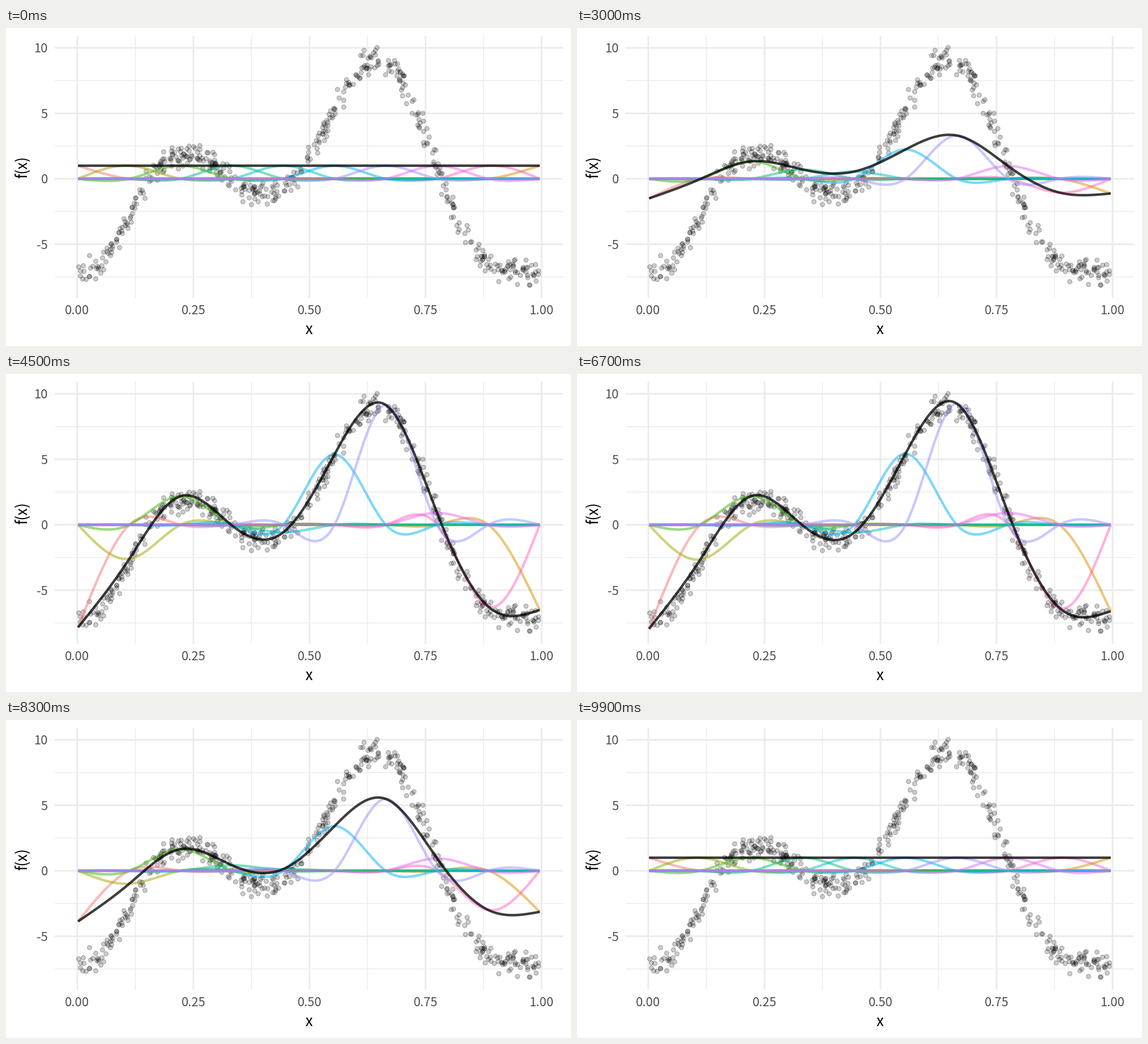
A matplotlib script that plays this animation: 998x561 px, repeating every 10 s.

```python
import numpy as np
import matplotlib.pyplot as plt
from matplotlib.animation import FuncAnimation

W, H, DPI = 998, 561, 64
FRAMES, INTERVAL = 100, 100
FONT = "Noto Sans CJK JP"
LEFT, RIGHT, TOP, BOTTOM = 86, 984, 14, 476

X_MIN, X_MAX, N_POINTS = .0015, .996, 490
COEFS = np.array([-7.95, -2.65, 2.2, -.06, -.6, 5.43, 9.25, .9, -6.35, -6.6])
COLORS = ["#F8766D", "#A3A500", "#39B600", "#00BF7D", "#00BFC4",
          "#00B0F6", "#9590FF", "#E76BF3", "#FF62BC", "#D89000"]
KNOTS = np.linspace(X_MIN, X_MAX, len(COEFS))
ORDER = np.roll(np.arange(len(COEFS)), 2)


def px(n):
    """Pixels to points."""
    return n * 72 / DPI


def sx(x):
    return 126 + 820 * np.asarray(x)


def sy(y):
    return 266 - 23.1 * np.asarray(y)


def signal(x):
    return x**11 * (10 * (1 - x))**6 + 10 * (10 * x)**3 * (1 - x)**10 - 7


def cardinal_basis(knots, x):
    """Natural cubic splines, each 1 at its own knot and 0 at the others."""
    n, h = len(knots), knots[1] - knots[0]
    a, b = np.eye(n), np.zeros((n, n))
    for i in range(1, n - 1):
        a[i, i - 1:i + 2] = 1, 4, 1
        b[i, i - 1:i + 2] = 6, -12, 6
    val, curv = np.eye(n), np.linalg.solve(a, b)
    j = np.clip(np.searchsorted(knots, x) - 1, 0, n - 2)
    r = ((x - knots[j]) / h)[:, None]
    l = 1 - r
    return (l * val[j] + r * val[j + 1]
            + ((l**3 - l) * curv[j] + (r**3 - r) * curv[j + 1]) / 6)


def cubic_in_out(t):
    t = np.clip(t, 0, 1)
    return 4 * t**3 if t < .5 else 1 - 4 * (1 - t)**3


def weight(i):
    """0 for the plain basis, 1 for the fitted one."""
    return cubic_in_out((i - 16) / 34) - cubic_in_out((i - 67) / 33)


fig = plt.figure(figsize=(W / DPI, H / DPI), dpi=DPI, facecolor="white")
ax = fig.add_axes([0, 0, 1, 1])
ax.set(xlim=(0, W), ylim=(H, 0))
ax.axis("off")


def grid(xs, ys, width):
    style = dict(colors="#EBEBEB", linewidths=px(width), zorder=1, snap=False)
    ax.vlines(sx(xs), TOP, BOTTOM, **style)
    ax.hlines(sy(ys), LEFT, RIGHT, **style)


def label(x, y, text, size, color, **kw):
    ax.text(x, y, text, fontsize=px(size), color=color, family=FONT,
            va="baseline", **kw)


x_ticks, y_ticks = np.arange(0, 1.1, .25), np.arange(-5, 11, 5)
grid(x_ticks[:-1] + .125, y_ticks - 2.5, 1.45)
grid(x_ticks, y_ticks, 2.9)
for v in x_ticks:
    label(sx(v), 505, f"{v:.2f}", 22, "#4D4D4D", ha="center")
for v in y_ticks:
    label(74, sy(v) + 8, str(v), 22, "#4D4D4D", ha="right")
label(535.5, 540, "x", 26, "black", ha="center")
label(36.5, 245.5, "f(x)", 26, "black", ha="center", rotation=90,
      rotation_mode="anchor")

rng = np.random.default_rng(20)
dx = rng.uniform(X_MIN, X_MAX, N_POINTS)
dy = signal(dx) + np.clip(rng.normal(0, .48, N_POINTS), -1.1, 1.1)
ax.scatter(sx(dx), sy(dy), s=px(7.8)**2, facecolor=(0, 0, 0, .2),
           edgecolor=(0, 0, 0, .31), linewidth=px(1), zorder=2)

grid_x = np.linspace(X_MIN, X_MAX, 400)
basis = cardinal_basis(KNOTS, grid_x)


def curve(color, alpha):
    return ax.plot([], [], color=color, alpha=alpha, lw=px(4.4), zorder=3,
                   solid_capstyle="butt", solid_joinstyle="round",
                   snap=False)[0]


parts = [curve(COLORS[k - 1 if k > len(COLORS) else k], .5) for k in ORDER]
total = curve("black", .76)


def draw(i):
    scaled = basis * (1 + weight(i) * (COEFS - 1))
    for line, k in zip(parts, ORDER):
        line.set_data(sx(grid_x), sy(scaled[:, k]))
    total.set_data(sx(grid_x), sy(scaled.sum(axis=1)))
    return [*parts, total]


anim = FuncAnimation(fig, draw, frames=FRAMES, interval=INTERVAL,
                     repeat=True, repeat_delay=0)
plt.show()
```
